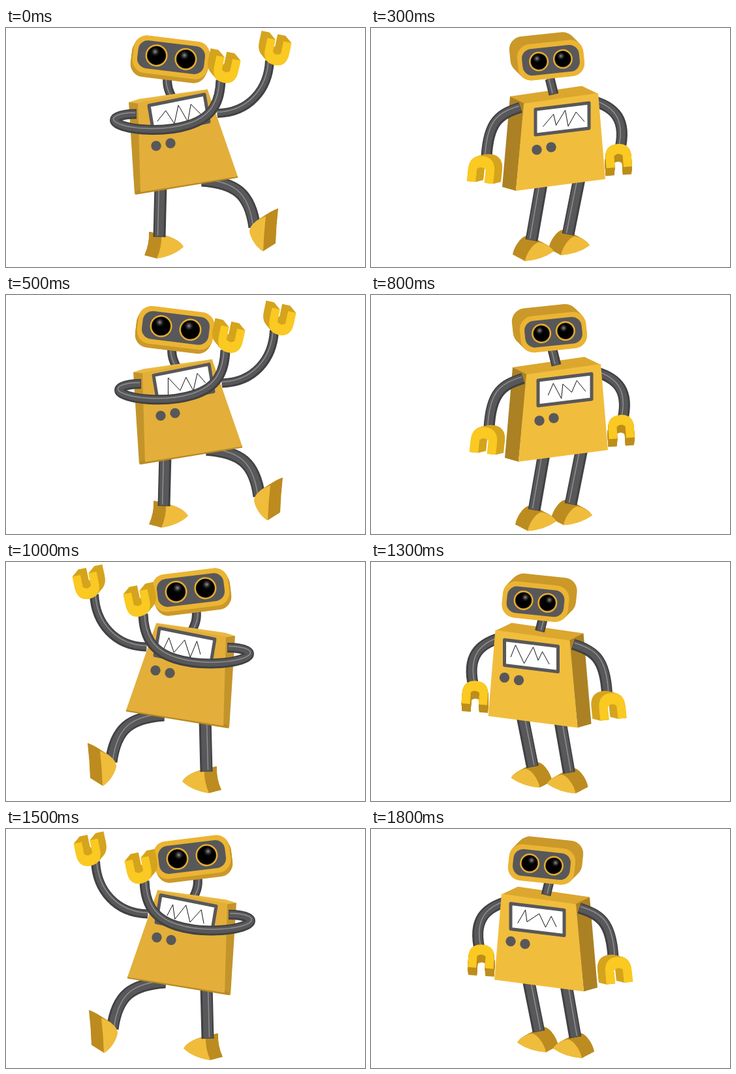
Write an HTML page with a canvas that moves like this. It is 550 px wide and 367 px high and loops after 2000 ms.

```html
<!DOCTYPE html>
<html lang="en">
<head>
<meta charset="utf-8">
<title>Dancing robot</title>
<style>
html, body { margin: 0; height: 100%; overflow: hidden; background: #fff; }
canvas { display: block; }
</style>
</head>
<body>
<canvas id="stage" width="550" height="367"></canvas>
<script>
const ctx = document.getElementById('stage').getContext('2d');
const GRAY = '#58585a';

// Each second has four beats (dab, stand, dab, stand); every other second is mirrored.
const beats = [0, 300, 500, 800];
const drift = [[0, 0], [0, 0], [7, 4], [4, 5.5], [0, 0], [-9.5, 4.5], [2, 0], [0, 0]];

function poseAt(t) {
  const flip = t >= 1000;
  const beat = beats.findLastIndex(start => start <= t % 1000);
  const id = beat + (flip ? 4 : 0);
  return { id, flip, dab: beat % 2 === 0, drift: drift[id] };
}

// Level 0 is the head, 1 the body and arms, 2 the feet: the mirrored robot leans by level.
function part({ dab, flip, drift: [dx, dy] }, level, paint) {
  ctx.save();
  ctx.translate(dx, dy * (1.4 - .3 * level));
  if (flip) {
    const sum = dab ? 536 + 3 * level : 537 + 11 * level;
    ctx.transform(-1, 0, 0, 1, sum, dab ? 1.5 * level - 2 : 5 - 5.5 * level);
  }
  paint();
  ctx.restore();
}

function place(path, x, y, deg, sx = 1, sy = 1) {
  const out = new Path2D();
  out.addPath(path, new DOMMatrix().translate(x, y).rotate(deg).scale(sx, sy));
  return out;
}

function extrude(path, dx, dy, side, front) {
  const n = 2 * Math.max(Math.abs(dx), Math.abs(dy));
  ctx.fillStyle = side;
  for (let i = n; i > 0; i--) {
    ctx.save();
    ctx.translate(dx * i / n, dy * i / n);
    ctx.fill(path);
    ctx.restore();
  }
  ctx.fillStyle = front;
  ctx.fill(path);
}

function fill(d, color) {
  ctx.fillStyle = color;
  ctx.fill(new Path2D(d));
}

function tube(d, w) {
  const path = new Path2D(d);
  const layer = (color, width, shift) => {
    ctx.save();
    ctx.translate(-shift, -shift);
    ctx.strokeStyle = color;
    ctx.lineWidth = width;
    ctx.stroke(path);
    ctx.restore();
  };
  layer('#414143', w, 0);
  layer(GRAY, w - 5, .5);
  layer('#8f8f91', 1.5, w * .13);
}

function disc(x, y, r, color) {
  ctx.fillStyle = color;
  ctx.beginPath();
  ctx.arc(x, y, r, 0, 7);
  ctx.fill();
}

function slab(w, h, r) {
  ctx.beginPath();
  ctx.roundRect(-w / 2, -h / 2, w, h, r);
  ctx.fill();
}

function eye(x, r) {
  disc(x, 0, r + 3, '#e9af2e');
  disc(x, 0, r + .7, '#4a3a16');
  disc(x, 0, r, '#000');
  const hx = x - r * .2, hy = -r * .4;
  const shine = ctx.createRadialGradient(hx, hy, 0, hx, hy, r * .6);
  shine.addColorStop(0, '#999');
  shine.addColorStop(1, '#0000');
  disc(hx, hy, r * .6, shine);
}

const clawShape = new Path2D('M-18-23h12v23q6 7 12 0v-23h12v20q0 26-18 26t-18-26z');

function claw(x, y, deg, sx, sy, dx, dy, side = '#d5a41e') {
  extrude(place(clawShape, x, y, deg, sx, sy), dx, dy, side, '#fac922');
}

const dabClaw = (x, y) => claw(x, y, 12, 1.05, .84, -9, -11);

function farArm(dab) {
  if (dab) {
    tube('M324 131C372 130 402 95 404 50', 14);
    dabClaw(415, 38);
  } else {
    tube('M343 113C372 122 393 140 381 188', 17);
    claw(379, 196, 176, 1.1, .78, -1, 12, '#bd8e1b');
  }
}

function nearArm(dab) {
  if (dab) {
    tube('M200 132C172 132 159 140 171 147C190 157 242 161 280 149C318 137 328 112 329 80', 15);
    dabClaw(337, 65);
  } else {
    tube('M229 122C198 132 180 142 177 198', 17);
    claw(169, 217, 186, 1.13, .88, 12, -3);
  }
}

function foot(d, dx, dy) {
  extrude(new Path2D(d), dx, dy, '#bd8c20', '#f0bc3b');
}

function legs(dab) {
  if (dab) {
    foot('M238 318C254 320 268 328 272 336C262 346 246 352 231 354Q239 336 238 318', -19, -5);
    tube('M237 240L235 321', 19);
    tube('M300 234C352 238 374 254 381 306', 19);
    foot('M398 289C382 295 373 304 373 313C376 327 386 339 394 343Q395 315 398 289', 19, -12);
  } else {
    for (const side of [1, 0]) {
      ctx.save();
      ctx.translate(55 * side, -9 * side);
      foot('M236 358C238 345 250 329 258 329C268 331 277 337 280 343Q262 356 236 358', -19, -10);
      ctx.restore();
    }
    tube('M261 240L246 326', 19);
    tube('M319 232L302 317', 19);
  }
}

function random(seed) {
  const s = Math.sin(seed * 127.1) * 43758.5453;
  return s - Math.floor(s);
}

// The screen is a parallelogram; u and v run from 0 to 1 along its edges.
function screen({ dab, id }) {
  const at = dab
    ? (u, v) => [219 + 85 * u + 7 * v, 119 - 17 * u + 42 * v]
    : (u, v) => [252 + 82 * u, 125 - 10 * u + 39 * v];
  const outline = new Path2D(`M${at(0, 0)}L${at(1, 0)}L${at(1, 1)}L${at(0, 1)}z`);
  ctx.fillStyle = '#fff';
  ctx.fill(outline);
  ctx.strokeStyle = GRAY;
  ctx.lineWidth = 5;
  ctx.stroke(outline);

  const points = [];
  for (let i = 0; i < 7; i++) {
    const u = .1 + .12 * (i + random(id + i * 3.7));
    const swing = .12 + .25 * random(id * 5.3 + i);
    points.push(at(u, .5 + (i % 2 ? -swing : swing)));
  }
  ctx.strokeStyle = '#111';
  ctx.lineWidth = 1;
  ctx.stroke(new Path2D('M' + points.join('L')));
}

function body(p) {
  if (p.dab) {
    tube('M248 72C245 88 250 98 256 110', 14);
    fill('M188 114L204 109 309 94 309 98 201 117z', '#eab843');
    fill('M188 114L203 116 207 252 197 255z', '#c3942a');
    fill('M200 250L355 227 355 230 198 256z', '#b88a24');
    fill('M202 115L309 95 355 228 206 252z', '#e3af3a');
  } else {
    fill('M213 105L323 89 348 101 234 117z', '#dca72f');
    fill('M213 105L235 116 222 250 201 244z', '#ab8124');
    fill('M234 116L348 100 359 232 222 250z', '#f1bd3d');
    tube('M274 78L280 102', 15);
  }
  screen(p);
  const x = (p.dab ? 230 : 254) + (p.flip ? 58 : 0);
  const y = (p.dab ? 181 : 187) - (p.flip ? 10 : 0);
  disc(x, y, 7.7, GRAY);
  disc(x + 22, y - 4, 7.7, GRAY);
}

function head({ dab }) {
  const [x, y, deg, w, h, dx, dy, gap, r] = dab
    ? [253, 45, 7, 117, 58, -3, 6, 22.6, 14]
    : [275.5, 49.5, -6, 102, 56, -12, -12, 18.5, 12];
  const face = new Path2D();
  face.roundRect(-w / 2, -h / 2, w, h, 20);
  extrude(place(face, x, y, deg), dx, dy, '#cb992a', '#ebb433');
  ctx.translate(x, y);
  ctx.rotate(deg * Math.PI / 180);
  ctx.fillStyle = GRAY;
  slab(w - 14, h - 15, 15);
  eye(-gap, r);
  eye(gap, r);
}

function draw(now) {
  const p = poseAt(now % 2000);
  ctx.fillStyle = '#fff';
  ctx.fillRect(0, 0, 550, 367);
  ctx.lineJoin = 'round';
  part(p, 1, () => farArm(p.dab));
  part(p, 2, () => legs(p.dab));
  part(p, 1, () => body(p));
  part(p, 0, () => head(p));
  part(p, 1, () => nearArm(p.dab));
}

const begin = performance.now();
function tick() {
  draw(performance.now() - begin);
  requestAnimationFrame(tick);
}
tick();
</script>
</body>
</html>
```
